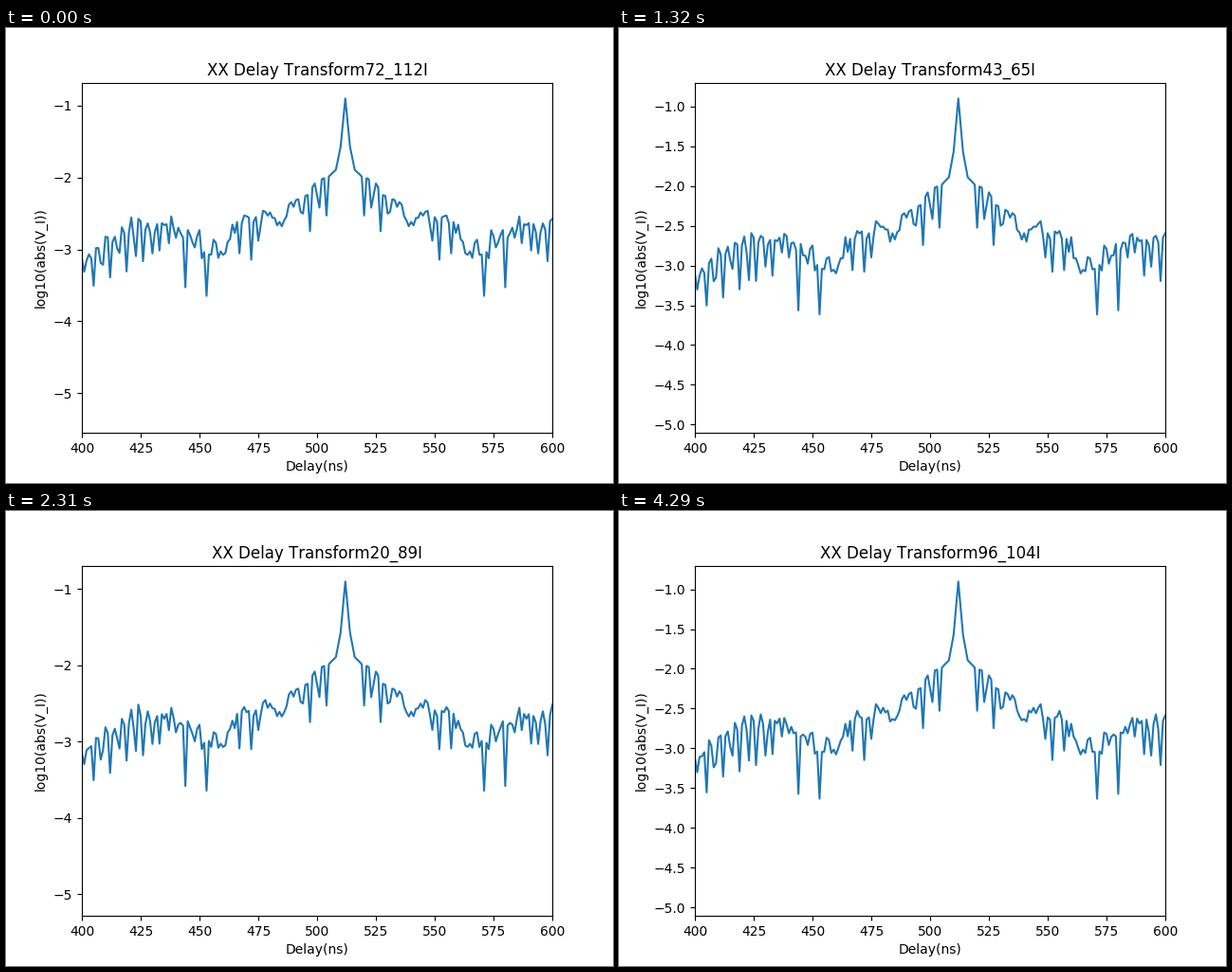
These frames come from a looping animation (640 px wide and 480 px high, 4.62 s). A matplotlib script:

```python
import numpy as np
import matplotlib.pyplot as plt
from matplotlib.animation import FuncAnimation

plt.rcParams["text.kerning_factor"] = 6  # whole-pixel kerning

CENTER = 512
DELAYS = np.arange(400, 601)
DISTANCE = np.arange(CENTER - 400 + 1)
RIPPLE_START, RIPPLE_PERIOD = 7.85, 3.545

# Key points by distance from the center, in log10 units.
CREST = [(0, -0.90), (2, -1.57), (4, -1.89), (7, -1.98), (10, -2.02),
         (13, -2.08), (16, -2.24), (23, -2.33), (27, -2.65), (32, -2.47),
         (43, -2.58), (52, -3.00), (64, -2.85), (74, -2.63), (88, -2.62),
         (95, -2.72), (106, -2.97), (112, -3.12)]
RIPPLE = [(6, 0), (8, 0.56), (15, 0.56), (19, 0.4), (22, 0.08), (34, 0.1),
          (50, 0.15), (75, 0.25), (82, 0.6), (107, 0.6), (112, 0.2)]
NOTCHES = {37: -2.87, 40: -3.10, 45: -3.04, 59: -3.62, 68: -3.54}

# (antenna pair, highest value, lowest value)
PLOTS = [
    ("72_112", -0.906, -5.328),
    ("80_104", -0.900, -4.565),
    ("88_105", -0.900, -4.555),
    ("22_81", -1.547, -5.583),
    ("43_65", -0.900, -4.905),
    ("9_88", -0.899, -4.929),
    ("9_22", -0.900, -4.680),
    ("20_89", -0.901, -5.074),
    ("10_97", -0.900, -4.976),
    ("53_64", -0.876, -5.162),
    ("31_65", -0.894, -4.543),
    ("43_72", -0.900, -4.700),
    ("64_112", -0.900, -4.700),
    ("96_104", -0.903, -4.906),
]


def through(points):
    return np.interp(DISTANCE, *zip(*points))


def noise(seed, size):
    fade_in = np.clip((DISTANCE - 18) / 20, 0, 1)
    return np.random.default_rng(seed).normal(0, size, len(DISTANCE)) * fade_in


def shared_spectrum():
    phase = 2 * np.pi * (DISTANCE - RIPPLE_START) / RIPPLE_PERIOD
    dips = np.maximum(np.cos(phase), 0) ** 1.5
    half = through(CREST) - through(RIPPLE) * dips + noise(100, 0.06)
    for k, value in NOTCHES.items():
        half[k] = value
    return half


SHARED = shared_spectrum()

fig, ax = plt.subplots(figsize=(6.4, 4.8), dpi=100)
ax.set_xlim(400, 600)
ax.set_xlabel("Delay(ns)")
ax.set_ylabel("log10(abs(V_I))")
line, = ax.plot([], [])


def draw(i):
    pair, peak, floor = PLOTS[i]
    half = SHARED + (peak - SHARED[0]) + noise(i, 0.03)
    margin = 0.05 * (peak - floor)
    line.set_data(DELAYS, half[np.abs(DELAYS - CENTER)])
    ax.set_ylim(floor - margin, peak + margin)
    ax.set_title(f"XX Delay Transform{pair}I")
    return line,


anim = FuncAnimation(fig, draw, frames=len(PLOTS), interval=330,
                     repeat=True, repeat_delay=0, blit=False)
plt.show()
```
